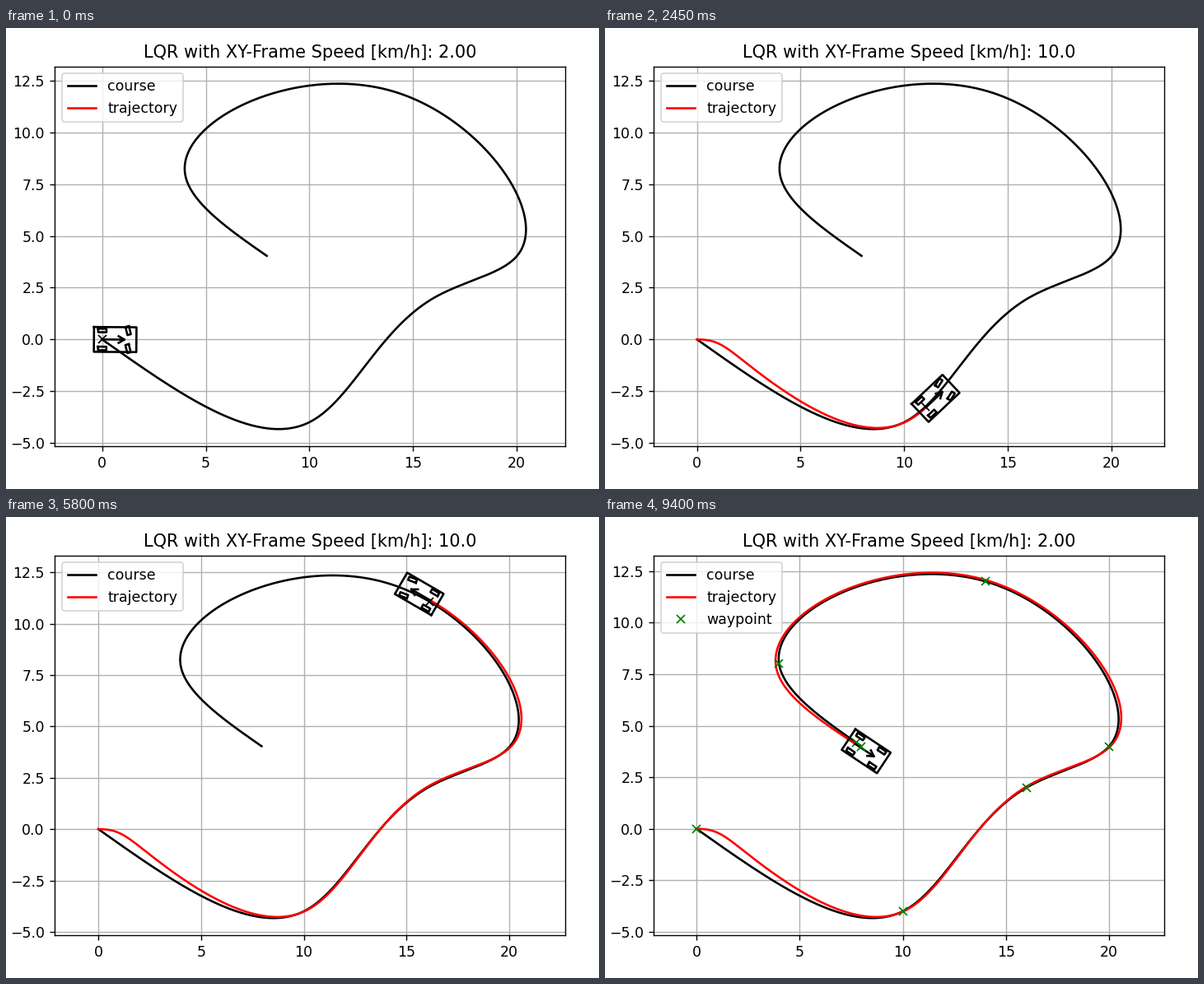
A matplotlib script for the animation above (9.95 s loop, 720 px wide and 560 px high).

```python
import numpy as np
import matplotlib.pyplot as plt
from matplotlib.animation import FuncAnimation

W, H, DPI = 720, 560, 125
INTERVAL, FRAMES = 50, 199
END = 9.4                      # time of arrival, s
UP, DOWN = 1.06, 0.97          # length of the speed ramps, s
V_LOW, V_HIGH = 2.0, 10.0      # km/h
PACE = 0.617                   # metres per second of film for each km/h

# Car geometry in metres
BACK, FRONT, HALF_W = 0.4, 1.65, 0.6
WHEELBASE, TRACK = 1.25, 0.435
TIRE_L, TIRE_W = 0.2, 0.085
ARROW = 1.07

# Tracking: how far and how late the car drifts out of a bend
DRIFT, LAG = 0.6, 3.5

WAYPOINTS = np.array([(0, 0), (10, -4), (16, 2), (20, 4),
                      (14, 12), (4, 8), (8, 4)], float)


def natural_spline(t, y):
    """Return a function that evaluates the natural cubic spline."""
    n, h = len(t), np.diff(t)
    slope = np.diff(y) / h
    a, b = np.eye(n), np.zeros(n)
    for i in range(1, n - 1):
        a[i, i - 1:i + 2] = h[i - 1], 2 * (h[i - 1] + h[i]), h[i]
        b[i] = 6 * (slope[i] - slope[i - 1])
    m = np.linalg.solve(a, b)

    def value(q):
        i = np.clip(np.searchsorted(t, q, side="right") - 1, 0, n - 2)
        d = q - t[i]
        first = slope[i] - h[i] * (2 * m[i] + m[i + 1]) / 6
        return (y[i] + first * d + m[i] * d**2 / 2
                + (m[i + 1] - m[i]) * d**3 / (6 * h[i]))
    return value


def lagged(values, dist):
    """Let the values trail behind along the distance."""
    out = np.zeros_like(values)
    gain = np.diff(dist) / LAG
    for i, g in enumerate(gain):
        out[i + 1] = out[i] + g * (values[i] - out[i])
    return out


def rotate(points, angle):
    c, s = np.cos(angle), np.sin(angle)
    return np.array([[c, -s], [s, c]]) @ points


def box(x0, x1, half):
    return np.array([[x0, x0, x1, x1, x0],
                     [half, -half, -half, half, half]])


# Course
chords = np.hypot(*np.diff(WAYPOINTS, axis=0).T)
knots = np.concatenate([[0], np.cumsum(chords)])
spline_x = natural_spline(knots, WAYPOINTS[:, 0])
spline_y = natural_spline(knots, WAYPOINTS[:, 1])
u = np.arange(0, knots[-1], 0.1)
course_x, course_y = spline_x(u), spline_y(u)

# Driven path: the course shifted along its normal. The car starts
# pointing along the x axis, so it first swings out to the left.
u = np.linspace(0, knots[-1], 4000)
cx, cy = spline_x(u), spline_y(u)
dist = np.concatenate([[0], np.cumsum(np.hypot(np.diff(cx), np.diff(cy)))])
heading = np.unwrap(np.arctan2(np.gradient(cy, u), np.gradient(cx, u)))
bend = np.gradient(heading, dist)
swing = 0.7 * np.exp(-dist / 5.5) * np.tanh(dist)
error = swing - DRIFT * lagged(bend, dist)
path_x = cx - error * np.sin(heading)
path_y = cy + error * np.cos(heading)
path_yaw = np.unwrap(np.arctan2(np.gradient(path_y), np.gradient(path_x)))
path_steer = 1.35 * np.arctan(WHEELBASE * bend) - 1.32 * np.exp(-dist / 0.8)


def speed(t):
    ramp = np.minimum(t / UP, (END - t) / DOWN)
    return V_LOW + (V_HIGH - V_LOW) * np.clip(ramp, 0, 1)


clock = np.linspace(0, END, 4701)
steps = PACE * (speed(clock[1:]) + speed(clock[:-1])) / 2 * np.diff(clock)
odometer = np.concatenate([[0], np.cumsum(steps)])


def car_parts(x, y, yaw, steer):
    """Outlines of body, wheels and arrow, placed in the world."""
    tire = box(-TIRE_L, TIRE_L, TIRE_W)
    parts = [box(-BACK, FRONT, HALF_W)]
    for side in (TRACK, -TRACK):
        parts.append(tire + [[0], [side]])
        parts.append(rotate(tire, steer) + [[WHEELBASE], [side]])
    barb = 0.3 * ARROW * np.array([np.cos(np.pi / 6), np.sin(np.pi / 6)])
    tip = ARROW - barb[0]
    parts.append(np.array([[0, ARROW], [0, 0]]))
    parts.append(np.array([[tip, ARROW, tip], [barb[1], 0, -barb[1]]]))
    return [rotate(p, yaw) + [[x], [y]] for p in parts]


fig = plt.figure(figsize=(W / DPI, H / DPI), dpi=DPI, facecolor="white")
ax = fig.add_axes([59 / W, 51.8 / H, 620 / W, 461.5 / H])
course, = ax.plot(course_x, course_y, "-k", label="course")
trail, = ax.plot([0], [0], "-r", label="trajectory")
target, = ax.plot([0], [0], "xk")
car = [ax.plot([0], [0], "-k")[0] for _ in range(7)]
marks, = ax.plot(*WAYPOINTS.T, "xg", label="waypoint")
short_key = ax.legend(handles=[course, trail], loc="upper left")
ax.add_artist(short_key)
full_key = ax.legend(handles=[course, trail, marks], loc="upper left")
ax.grid(True)
ax.axis("equal")
title = ax.set_title("")


def update(frame):
    t = min(frame * INTERVAL / 1000, END)
    done = t >= END
    s = np.interp(t, clock, odometer)
    x, y, yaw, steer = (np.interp(s, dist, a) for a in
                        (path_x, path_y, path_yaw, path_steer))
    n = np.searchsorted(dist, s)
    trail.set_data(np.append(path_x[:n], x), np.append(path_y[:n], y))
    target.set_data([np.interp(s, dist, cx)], [np.interp(s, dist, cy)])
    target.set_color("g" if t > 7 else "k")
    for line, part in zip(car, car_parts(x, y, yaw, steer)):
        line.set_data(part[0], part[1])
    marks.set_visible(done)
    full_key.set_visible(done)
    short_key.set_visible(not done)
    shown = f"{speed(t):.2f}"[:4]
    title.set_text(f"LQR with XY-Frame Speed [km/h]: {shown}")
    ax.relim()
    ax.autoscale_view()
    return []


anim = FuncAnimation(fig, update, frames=FRAMES, interval=INTERVAL,
                     init_func=lambda: [], repeat=True, repeat_delay=0)
plt.show()
```
